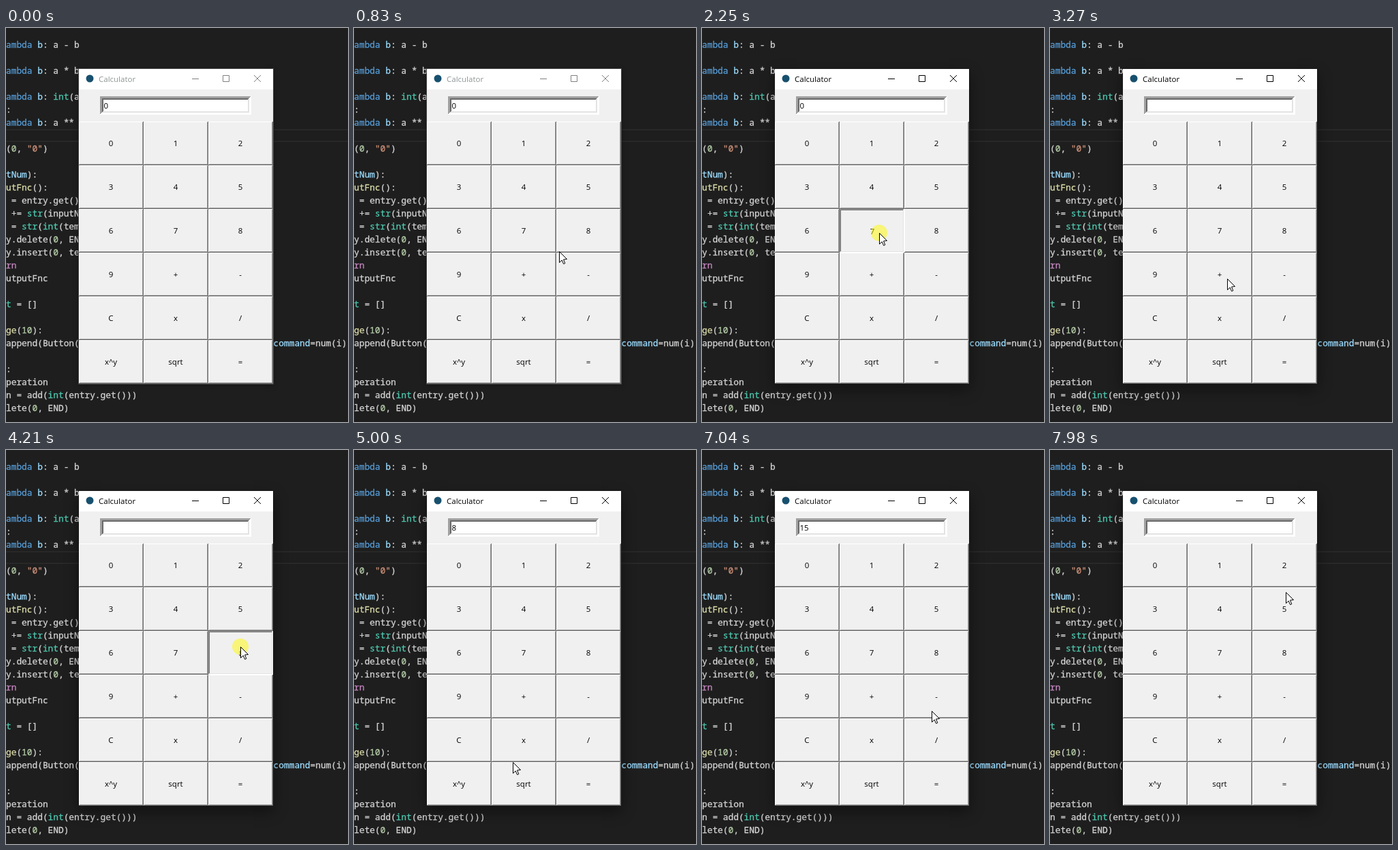
Recreate the animation shown at these times as an HTML page with a canvas. Size 502 by 577 pixels, loop 8000 ms.

```html
<!DOCTYPE html>
<html lang="en">
<head>
<meta charset="utf-8">
<title>Calculator</title>
<style>
html, body { margin: 0; width: 100%; height: 100%; overflow: hidden; background: #1e1e1e; }
canvas { display: block; }
</style>
</head>
<body>
<canvas id="stage" width="502" height="577"></canvas>
<script>
const ctx = document.getElementById('stage').getContext('2d');
const LOOP = 8000;
const STEP = 78.65;
const ENTER = 200;
const HOLD = 70;
const UI = '11.5px "Open Sans", "Noto Sans", sans-serif';
const MONO = '12.83px "Noto Sans Mono", monospace';
const CHAR_W = 7.698;
const LINE_H = 19;
const WIN = { x: 107, y: 60, w: 285, h: 461 };
const KEY = { w: 95, h: 64, top: 137 };

const CODE = `ambda b: a - b

ambda b: a * b

ambda b: int(a
:
ambda b: a **

(0, "0")

tNum):
utFnc():
 = entry.get()
 += str(inputN
 = str(int(tem
y.delete(0, EN
y.insert(0, te
rn
utputFnc

t = []

ge(10):
${'append(Button('.padEnd(51)}command=num(i))

:
peration
n = add(int(entry.get()))
lete(0, END)`.split('\n');

const TOKEN = /("[^"]*")|(\d+)|(\b(?:int|str)\b|^t(?= ))|(ambda)|(^rn)|(^ge|^utFnc)|(tNum|command| b(?=:))/g;
const TOKEN_COLORS = ['#ce9178', '#b5cea8', '#4ec9b0', '#569cd6', '#c586c0', '#dcdcaa', '#9cdcfe'];
const PLAIN = '#d4d4d4';

const LABELS = [...'0123456789+-Cx/', 'x^y', 'sqrt', '='];

// Press time, pressed label, entry text after release
const CLICKS = [
  [2250, '7', '7'], [3040, '+', ''], [4210, '8', '8'], [5540, '=', '15'], [7350, '/', '']
];

// Pointer strokes: start and end time, end point, bend point
const ORIGIN = [411, 500];
const STROKES = [
  [200, 990, [311, 287], [267, 382]],
  [990, 1700, [263, 290], [290, 236]],
  [1780, 2090, [260, 300], [258, 294]],
  [2490, 2880, [260, 367], [283, 340]],
  [3435, 4050, [344, 288], [310, 204]],
  [4290, 5000, [232, 458], [320, 370]],
  [5000, 5390, [334, 492], [285, 478]],
  [6170, 6330, [322, 484], [328, 488]],
  [6410, 6880, [337, 376], [312, 440]],
  [6960, 7200, [340, 404], [337, 382]],
  [7510, 7980, [346, 208], [289, 126]]
];

function rect(color, x, y, w, h) {
  ctx.fillStyle = color;
  ctx.fillRect(x, y, w, h);
}

function disc(color, x, y, r) {
  ctx.fillStyle = color;
  ctx.beginPath();
  ctx.arc(x, y, r, 0, 2 * Math.PI);
  ctx.fill();
}

function text(str, x, y, color, font = UI, align = 'left') {
  ctx.font = font;
  ctx.textAlign = align;
  ctx.fillStyle = color;
  ctx.fillText(str, x, y);
}

// Stepped edge: one-pixel rings, bottom and right own the corners
function bevel(x, y, w, h, size, topLeft, bottomRight) {
  for (let k = 0; k < size; k++) {
    const rw = w - 2 * k, rh = h - 2 * k;
    rect(topLeft, x + k, y + k, rw, 1);
    rect(topLeft, x + k, y + k, 1, rh);
    rect(bottomRight, x + k, y + h - k - 1, rw, 1);
    rect(bottomRight, x + w - k - 1, y + k, 1, rh);
  }
}

function pointerAt(t) {
  const now = ENTER + Math.floor((t - ENTER + 6) / STEP) * STEP;
  let at = ORIGIN;
  for (const [from, to, end, bend] of STROKES) {
    if (now < from) break;
    const u = Math.min(1, (now - from) / (to - from)), v = 1 - u;
    at = at.map((p, i) => v * v * p + 2 * u * v * bend[i] + u * u * end[i]);
  }
  return at.map(Math.round);
}

function drawCodeLine(line, row) {
  const y = 29 + row * LINE_H;
  const put = (str, col, color) => {
    text(str, col * CHAR_W, y, color, MONO);
    ctx.strokeStyle = color;
    ctx.lineWidth = .3;
    ctx.strokeText(str, col * CHAR_W, y);
  };
  let pos = 0;
  for (const m of line.matchAll(TOKEN)) {
    put(line.slice(pos, m.index), pos, PLAIN);
    put(m[0], m.index, TOKEN_COLORS[m.slice(1).findIndex(Boolean)]);
    pos = m.index + m[0].length;
  }
  put(line.slice(pos), pos, PLAIN);
}

function drawEditor() {
  rect('#1e1e1e', 0, 0, 502, 577);
  rect('#282828', 0, 148, 502, 2);
  rect('#282828', 0, 165, 502, 2);
  CODE.forEach(drawCodeLine);
}

function drawWindow(active) {
  const { x, y, w, h } = WIN;
  ctx.save();
  ctx.shadowColor = active ? 'rgba(0,0,0,.45)' : 'rgba(0,0,0,.4)';
  ctx.shadowBlur = active ? 20 : 8;
  ctx.shadowOffsetY = active ? 8 : 2;
  rect('#f0f0f0', x, y, w, h);
  ctx.restore();
  if (!active) bevel(x - 1, y - 1, w + 2, h + 2, 1, '#4a4a4a', '#4a4a4a');
  rect('#ffffff', x, y, w, 30);

  disc('#17506e', 123, 74, 5.5);
  text('Calculator', 136, 79, active ? '#000000' : '#8f9595');

  ctx.strokeStyle = active ? '#000000' : '#808080';
  ctx.lineWidth = 1;
  ctx.beginPath();
  ctx.moveTo(273, 74.5);
  ctx.lineTo(283, 74.5);
  ctx.rect(318.5, 69.5, 9, 9);
  ctx.moveTo(364, 69);
  ctx.lineTo(374, 79);
  ctx.moveTo(374, 69);
  ctx.lineTo(364, 79);
  ctx.stroke();
}

function drawEntry(value) {
  bevel(138, 100, 222, 27, 3, '#a0a0a0', '#ffffff');
  rect('#ffffff', 141, 103, 216, 21);
  bevel(141, 103, 216, 21, 2, '#696969', '#e3e3e3');
  text(value, 143.5, 118, '#000000');
}

function drawButton(label, i, down) {
  const { w, h } = KEY;
  const x = WIN.x + (i % 3) * w, y = KEY.top + Math.floor(i / 3) * h;
  const [outer, inner] = down
    ? [['#a0a0a0', '#ffffff'], ['#696969', '#e3e3e3']]
    : [['#ffffff', '#696969'], ['#f0f0f0', '#a0a0a0']];
  rect('#f0f0f0', x, y, w, h);
  bevel(x, y, w, h, 1, ...outer);
  bevel(x + 1, y + 1, w - 2, h - 2, 1, ...inner);
  const shift = down ? 1 : 0;
  text(label, x + 47 + shift, y + 36 + shift, '#000000', UI, 'center');
}

function drawPointer(x, y, down) {
  if (down) disc('rgba(255,250,0,.5)', x, y, 12);
  ctx.save();
  ctx.translate(x, y);
  const arrow = new Path2D('M.5 .5V16.5L4.2 13 6.6 18.5 8.8 17.6 6.5 12 11.5 11.5Z');
  ctx.fillStyle = '#ffffff';
  ctx.strokeStyle = '#000000';
  ctx.lineWidth = 1;
  ctx.fill(arrow);
  ctx.stroke(arrow);
  ctx.restore();
}

function draw(t) {
  const click = CLICKS.findLast(([at]) => t >= at);
  const pressed = click && t < click[0] + HOLD ? click[1] : null;
  const released = CLICKS.findLast(([at]) => t >= at + HOLD);
  drawEditor();
  drawWindow(Boolean(click));
  drawEntry(released ? released[2] : '0');
  LABELS.forEach((label, i) => drawButton(label, i, label === pressed));
  if (t >= ENTER) drawPointer(...pointerAt(t), pressed);
}

const start = performance.now();
function tick() {
  draw((performance.now() - start) % LOOP);
  requestAnimationFrame(tick);
}
tick();
</script>
</body>
</html>
```
